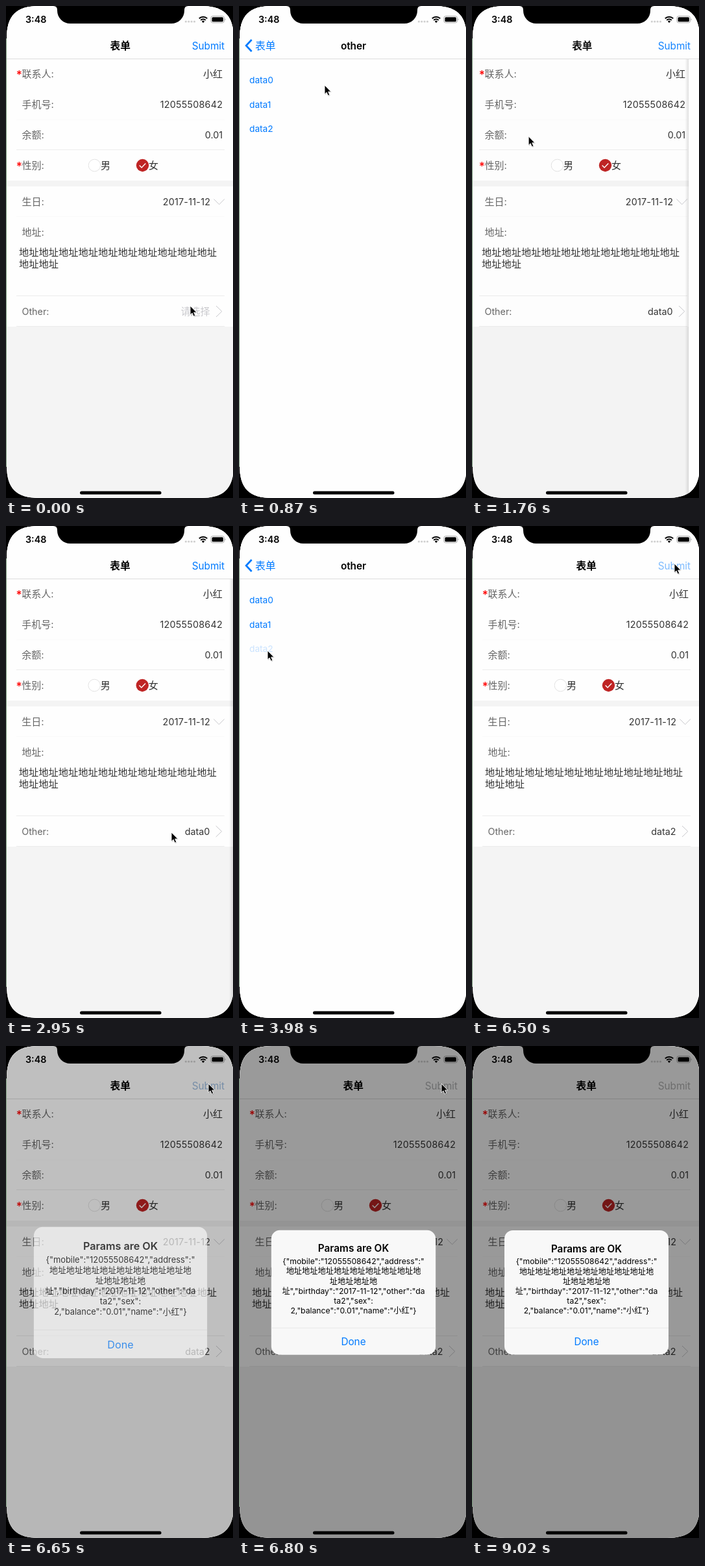
Animation of 350 by 758 pixels, one loop 9120 ms. Source, as an HTML page:

```html
<!DOCTYPE html>
<html lang="zh-CN">
<head>
<meta charset="utf-8">
<title>Form</title>
<style>
html, body { margin: 0; width: 100%; height: 100%; overflow: hidden; background: #000; }
svg { display: block; width: 100%; height: 100%; }
text { font-family: Inter, "Noto Sans CJK SC", "Noto Sans CJK", sans-serif; font-size: 15px; white-space: pre; }
.label { fill: #666; }
.value { fill: #333; }
.latin { font-size: 14.3px; }
.digits { letter-spacing: .25px; }
.end { text-anchor: end; }
.mid { text-anchor: middle; }
.star { fill: #f00; font-size: 17.5px; font-weight: 500; }
.hint { fill: #c9c9cd; }
.address { font-size: 15.25px; fill: #333; }
.link { fill: #007aff; }
.item { font-size: 13.7px; }
.bar { font-size: 15.3px; }
.cjkbar { font-size: 15.7px; }
.bold { font-weight: 600; }
.msg { font-size: 12.2px; text-anchor: middle; }
.line { fill: none; stroke: #c8c8cc; stroke-width: 1; }
.rule { stroke: #ececec; }
.faint { stroke: #fafafa; }
</style>
</head>
<body>
<svg viewBox="0 0 350 758" preserveAspectRatio="none">
  <defs>
    <clipPath id="screen">
      <path d="M1 50C1 14.8 15.8 0 51 0H301C336.2 0 351 14.8 351 50V708C351 743.2 336.2 758 301 758H51C15.8 758 1 743.2 1 708Z"/>
    </clipPath>
    <linearGradient id="shade">
      <stop offset="0" stop-color="#000" stop-opacity="0"/>
      <stop offset="1" stop-color="#000" stop-opacity=".12"/>
    </linearGradient>
  </defs>
  <rect width="350" height="758"/>
  <rect y="50" width="1" height="660" fill="#7d9c80"/>

  <g clip-path="url(#screen)">
    <rect width="351" height="758" fill="#fff"/>

    <g id="form">
      <rect x="1" width="350" height="758" fill="#f4f4f4"/>
      <rect x="1" y="82" width="350" height="187" fill="#fefefe"/>
      <rect x="1" y="278" width="350" height="216" fill="#fefefe"/>
      <path class="faint" d="M16 175.5H337M16 324.5H337"/>
      <path class="rule" d="M16 221.5H337M16 446.5H337M16 493.5H337"/>

      <text class="star" x="15.8" y="112.2">*</text>
      <text class="label" x="24.5" y="110.3">联系人:</text>
      <text class="value end" x="334" y="110.3">小红</text>
      <text class="label" x="24.5" y="157.2">手机号:</text>
      <text class="value latin digits end" x="334.2" y="157">12055508642</text>
      <text class="label" x="24.5" y="204">余额:</text>
      <text class="value latin end" x="334" y="203.8">0.01</text>

      <text class="star" x="15.8" y="252.9">*</text>
      <text class="label" x="24.5" y="251">性别:</text>
      <circle cx="136.5" cy="245.5" r="9.3" fill="#fff" stroke="#e2e2e2"/>
      <text class="value" x="146" y="251">男</text>
      <circle cx="210.5" cy="245.5" r="9.7" fill="#bf2424"/>
      <path d="M205.7 245.6l3.4 3.4 6.2-6.4" fill="none" stroke="#fff" stroke-width="1.4"/>
      <text class="value" x="220" y="251">女</text>

      <text class="label" x="24.5" y="307.2">生日:</text>
      <text class="value latin digits end" x="315.2" y="307">2017-11-12</text>
      <path class="line" d="M320.5 297.5l8.2 8.2 8.2-8.2"/>
      <text class="label" x="24.5" y="354">地址:</text>
      <text class="address" x="20" y="385" id="addr1"></text>
      <text class="address" x="20" y="402.8" id="addr2"></text>

      <text class="label latin" x="24.5" y="475.8">Other:</text>
      <text class="end" x="314.5" y="475.8" id="choice"></text>
      <path class="line" d="M324 462l8.8 8.5-8.8 8.5"/>
    </g>
    <rect id="veil" x="1" width="350" height="758"/>

    <g id="list">
      <rect x="-5" width="6" height="758" fill="url(#shade)"/>
      <rect x="1" width="350" height="758" fill="#fefefe"/>
      <text class="link item" x="16" y="119.3" id="item0">data0</text>
      <text class="link item" x="16" y="156.8">data1</text>
      <text class="link item" x="16" y="194.2" id="item2">data2</text>
    </g>

    <rect x="1" width="350" height="81" fill="#fefefe"/>
    <path d="M1 81.5H351" stroke="#dcdcdc"/>
    <text class="cjkbar bold mid" y="66.6" id="title">表单</text>
    <text class="cjkbar link mid" y="66.6" id="back">表单</text>
    <path id="arrow" d="M19.5 52l-8.5 9 8.5 9" fill="none" stroke="#007aff" stroke-width="2.7"/>
    <text class="bar bold mid" y="66.5" id="other">other</text>
    <text class="bar end" x="337" y="66.5" id="submit">Submit</text>

    <text class="bold" x="30" y="25.8" style="font-size:14.3px">3:48</text>
    <g fill="#cfcfcf">
      <circle cx="277.3" cy="24" r="1.6"/><circle cx="281.7" cy="24" r="1.6"/>
      <circle cx="286.1" cy="24" r="1.6"/><circle cx="290.5" cy="24" r="1.6"/>
    </g>
    <path d="M297.8 19.3a8.8 8.8 0 0 1 12.4 0M300.2 21.9a5.4 5.4 0 0 1 7.6 0" fill="none" stroke="#000" stroke-width="2"/>
    <path d="M304 26l-2.2-2.3a3.1 3.1 0 0 1 4.4 0z"/>
    <rect x="315.9" y="15.6" width="20.6" height="10.2" rx="2.8" fill="none" stroke="#a2a2a2" stroke-width=".9"/>
    <rect x="317.5" y="17.2" width="17.4" height="7" rx="1.5"/>
    <path d="M337.6 19a2 2 0 0 1 0 3.5z" fill="#a2a2a2"/>
    <rect id="dim" x="1" width="350" height="758"/>
    <path d="M73 0Q79 0 79 6V7A20 20 0 0 0 99 27H255A20 20 0 0 0 275 7V6Q275 0 281 0Z"/>

    <g id="alert">
      <rect x="50" y="284" width="253" height="191.5" rx="13" fill="#f8f8f8"/>
      <path d="M50 434.5H303" stroke="#e9e9e9"/>
      <text class="bar bold mid" x="176.5" y="317.6">Params are OK</text>
      <g id="message"></g>
      <text class="bar link mid" x="176.5" y="461">Done</text>
    </g>
    <rect x="114" y="747.4" width="125.5" height="5" rx="2.5"/>
  </g>

  <g id="cursor">
    <path d="M0 0V13.8L3.1 11 5.2 16 7.7 15 5.6 10.1H9.9Z" transform="translate(.8 1)" opacity=".25"/>
    <path d="M0 0V13.8L3.1 11 5.2 16 7.7 15 5.6 10.1H9.9Z" stroke="#fff" stroke-width=".9"/>
  </g>
</svg>
<script>
const LOOP = 9120, WIDTH = 350;
const $ = id => document.getElementById(id);
const set = (id, attrs) => {
  for (const k in attrs) $(id).setAttribute(k, attrs[k]);
};
const clamp = x => Math.min(1, Math.max(0, x));
const mix = (a, b, p) => a + (b - a) * p;
const smooth = p => p * p * (3 - 2 * p);

// Critically damped spring from 0 to 1
function spring(ms, speed) {
  const s = Math.max(0, ms) / 1000 * speed;
  return clamp((1 - (1 + s) * Math.exp(-s)) * 1.006);
}

// Opacity of a control held down between two times
function press(t, down, up, low) {
  const held = clamp((t - down) / 60) * (1 - clamp((t - up) / 250));
  return mix(1, low, held);
}

const PUSHES = [285, 2946], POPS = [1450, 4110];
const ALERT_AT = 6570;

// Time, x, y of the pointer tip
const PATH = [
  [330, 284, 462], [860, 132, 122], [960, 132, 122], [1160, 36, 118],
  [1500, 36, 118], [2330, 254, 471], [2370, 254, 471], [2490, 255, 472],
  [3000, 255, 472], [3830, 44, 192], [4150, 44, 192], [5000, 287, 371],
  [5060, 287, 371], [5560, 310, 53], [5720, 312, 58],
  [6830, 312, 58], [7220, 236, 775]
];

function pointer(t) {
  const i = PATH.findIndex(k => k[0] > t);
  if (i < 0) return null;
  if (i === 0) return PATH[0].slice(1);
  const [a, b] = [PATH[i - 1], PATH[i]];
  const p = smooth((t - a[0]) / (b[0] - a[0]));
  return [mix(a[1], b[1], p), mix(a[2], b[2], p)];
}

const addr = '地址'.repeat(12);
$('addr1').textContent = addr.slice(0, 20);
$('addr2').textContent = addr.slice(20);
[
  '{"mobile":"12055508642","address":"',
  addr.slice(0, 17),
  addr.slice(17, 23),
  addr.slice(23) + '","birthday":"2017-11-12","other":"da',
  'ta2","sex":',
  '2,"balance":"0.01","name":"小红"}'
].forEach((line, i) => {
  const el = document.createElementNS('http://www.w3.org/2000/svg', 'text');
  el.setAttribute('class', 'msg');
  el.setAttribute('x', 176.5);
  el.setAttribute('y', 336.4 + i * 15.1);
  el.textContent = line;
  $('message').append(el);
});

function drawPages(t) {
  let p = 0;
  PUSHES.forEach((start, i) => {
    p += spring(t - start, 15) - spring(t - POPS[i], 15);
  });
  set('form', { transform: `translate(${-0.3 * WIDTH * p} 0)` });
  set('veil', { opacity: 0.1 * p });
  set('list', {
    transform: `translate(${WIDTH * (1 - p)} 0)`,
    visibility: p > 0 ? 'visible' : 'hidden'
  });

  const x = mix(176.3, 40.7, p);
  set('title', { x, opacity: clamp(1 - p * 1.6) });
  set('back', { x, opacity: clamp(p * 1.6 - 0.6) });
  set('arrow', { opacity: clamp(p * 1.6 - 0.6) });
  set('other', { x: mix(330, 176.5, p), opacity: clamp(p * 1.4 - 0.4) });

  const choice = t < POPS[0] ? '请选择' : t < POPS[1] ? 'data0' : 'data2';
  $('choice').textContent = choice;
  set('choice', { class: 'end ' + (t < POPS[0] ? 'hint' : 'value latin') });
  set('item0', { opacity: press(t, 1230, 1430, 0.2) });
  set('item2', { opacity: press(t, 3890, 4090, 0.2) });
  return p;
}

function drawAlert(t, page) {
  const a = spring(t - ALERT_AT, 26);
  set('dim', { opacity: 0.4 * a });
  const size = mix(1.15, 1, a);
  set('alert', {
    opacity: clamp(a * 1.1),
    transform: `translate(176.5 379.7) scale(${size}) translate(-176.5 -379.7)`
  });
  const tint = [0, 122, 255].map(c => Math.round(mix(c, 180, a)));
  set('submit', {
    fill: `rgb(${tint})`,
    opacity: clamp(1 - page * 1.6) * press(t, 6430, 6560, 0.5)
  });
}

function draw(t) {
  drawAlert(t, drawPages(t));
  const tip = pointer(t);
  set('cursor', { visibility: tip ? 'visible' : 'hidden' });
  if (tip) set('cursor', { transform: `translate(${tip})` });
}

const start = performance.now();
function frame() {
  draw((performance.now() - start) % LOOP);
  requestAnimationFrame(frame);
}
frame();
</script>
</body>
</html>
```
